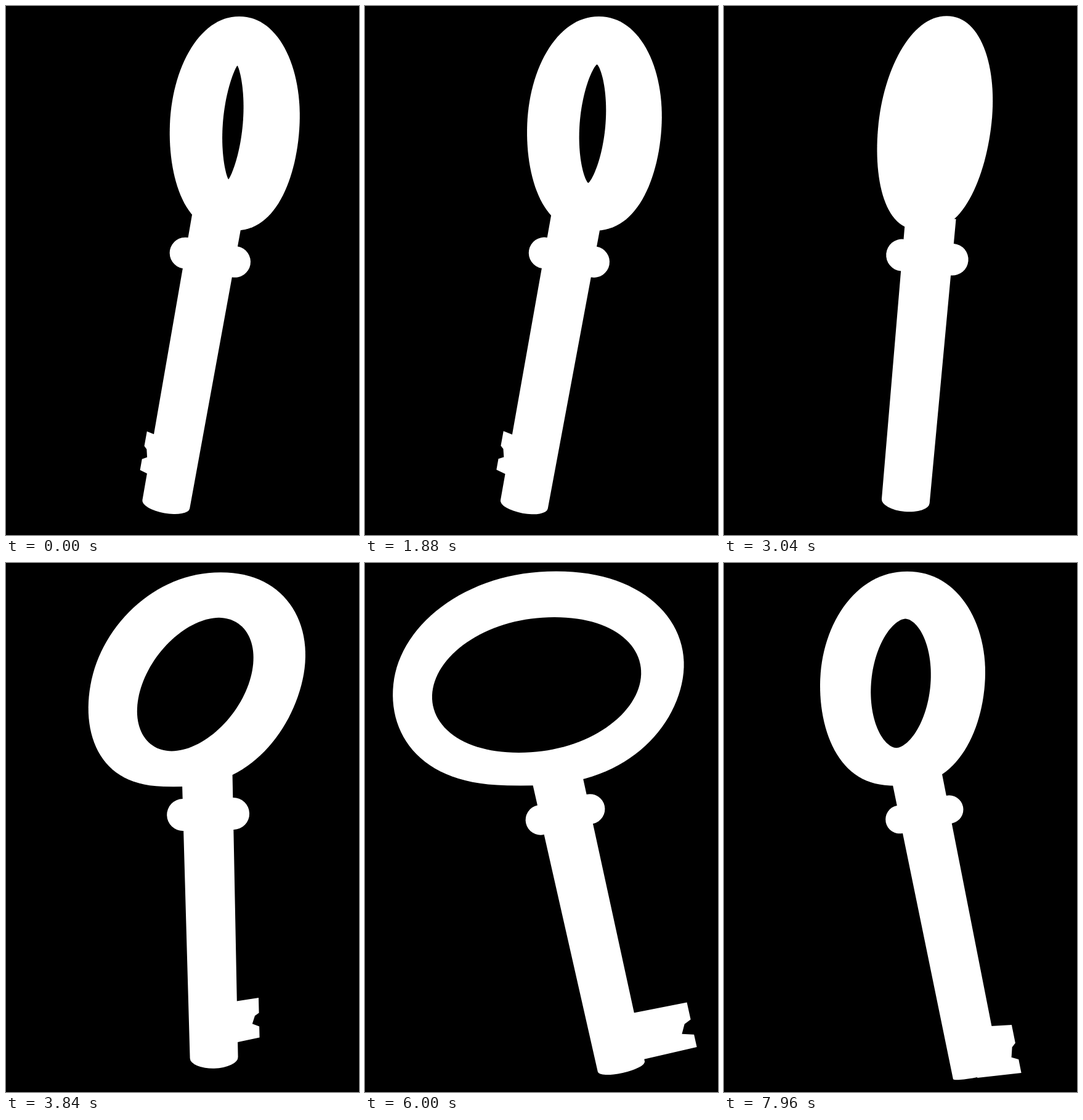
Animation of 573 by 859 pixels, one loop 8 s. Source, as an HTML page with a canvas:

```html
<!DOCTYPE html>
<html lang="en">
<head>
<meta charset="utf-8">
<title>Turning key</title>
<style>
  html, body { margin: 0; width: 100%; height: 100%; overflow: hidden; background: #000; }
  canvas { display: block; width: 100vw; height: 100vh; }
</style>
</head>
<body>
<canvas id="stage" width="573" height="859"></canvas>
<script>
const LOOP = 8000;
const PIVOT = { x: 328.5, y: 424 };
const { sin, cos, abs, sign, sqrt, hypot, PI } = Math;
const ctx = document.getElementById('stage').getContext('2d');

// Time in ms and turn in radians: 0 is edge-on, PI / 2 is face-on.
const TURN = [
  [0, -.293], [930, -.51], [1880, -.319], [3040, .205],
  [4640, 1.235], [6000, 1.939], [6800, 2.304], [7960, 2.673]
];

// Outline of the bit: share of its reach, share of its height
const BIT = [[1, 0], [1, .38], [.91, .45], [.85, .65], [1, .72], [1, 1]];

// Smooth curve through the key turns
function turnAt(time) {
  const last = TURN.length - 1;
  let i = 0;
  while (i < last - 1 && time >= TURN[i + 1][0]) i++;
  const slope = (p, q) => (q[1] - p[1]) / (q[0] - p[0]);
  const a = TURN[i], b = TURN[i + 1];
  const span = b[0] - a[0];
  const u = Math.min((time - a[0]) / span, 1), v = 1 - u;
  const start = slope(TURN[Math.max(i - 1, 0)], b) * span;
  const end = slope(a, TURN[Math.min(i + 2, last)]) * span;
  return v * v * ((1 + 2 * u) * a[1] + u * start)
       + u * u * ((3 - 2 * u) * b[1] - v * end);
}

// Leaning oval; a power below 1 makes its half fuller, above 1 more pointed.
function oval({ x, y, rx, ry, lean, topPower, bottomPower }, color) {
  if (rx <= lean) return;
  const width = sqrt(rx * rx - lean * lean);
  ctx.fillStyle = color;
  ctx.beginPath();
  for (let i = 0; i < 120; i++) {
    const c = cos(i * PI / 60), s = sin(i * PI / 60);
    const side = sign(c) * abs(c) ** (s > 0 ? bottomPower : topPower);
    ctx.lineTo(x + width * side - lean * s, y + ry * s);
  }
  ctx.fill();
}

function bow(turn, sway) {
  const facing = abs(sin(turn));
  const lean = 27 + 20 * cos(2 * turn - 2.4);
  const ring = {
    x: 325 - 50 * sway - 10 * sin(2 * turn - .2), y: 189.5 - 2 * sway,
    rx: hypot(80, 238 * facing), ry: 174,
    lean, topPower: .95, bottomPower: .8
  };
  oval(ring, '#fff');

  // The thick wall closes the hole when the bow is nearly edge-on.
  const gap = ring.rx - 85 + 25 * facing ** 4;
  const rx = gap - 60 / gap;
  const ry = 112 - 350 / rx;
  const power = .88 + 13 / rx;
  oval({ x: ring.x - 3, y: 143 + ry / 2, rx, ry, lean, topPower: power, bottomPower: power }, '#000');
}

function shaft(length, sag) {
  ctx.beginPath();
  ctx.moveTo(-41, -82);
  ctx.lineTo(41, -82);
  ctx.ellipse(0, length, 39, sag, 0, 0, PI);
  ctx.fill();
}

function collar(radius) {
  ctx.lineCap = 'round';
  ctx.lineWidth = radius * 2;
  ctx.beginPath();
  ctx.moveTo(-41, -16);
  ctx.lineTo(41, -16);
  ctx.stroke();
}

function bit(turn) {
  const reach = 131 * cos(turn - 1.68);
  const depth = sin(turn - 1.68);
  const top = 315 + 38 * depth;
  const height = 72 + 9 * depth;
  const root = top - 12 * depth;
  ctx.beginPath();
  ctx.moveTo(0, root);
  for (const [out, down] of BIT) ctx.lineTo(reach * out, top + height * down);
  ctx.lineTo(0, root + height + 4);
  ctx.fill();
}

function draw() {
  const turn = turnAt(performance.now() % LOOP);
  const sway = cos(turn - 2.18);
  const pitch = cos(turn - .55);
  const tilt = -.225 * sway;

  ctx.fillStyle = '#000';
  ctx.fillRect(0, 0, 573, 859);
  bow(turn, sway);

  ctx.save();
  ctx.translate(PIVOT.x, PIVOT.y);
  ctx.rotate(tilt);
  ctx.fillStyle = ctx.strokeStyle = '#fff';
  shaft((397 - 18 * pitch) / cos(tilt), 9 + 8.5 * pitch);
  collar(24 + 2 * pitch);
  bit(turn);
  ctx.restore();
  requestAnimationFrame(draw);
}
draw();
</script>
</body>
</html>
```
